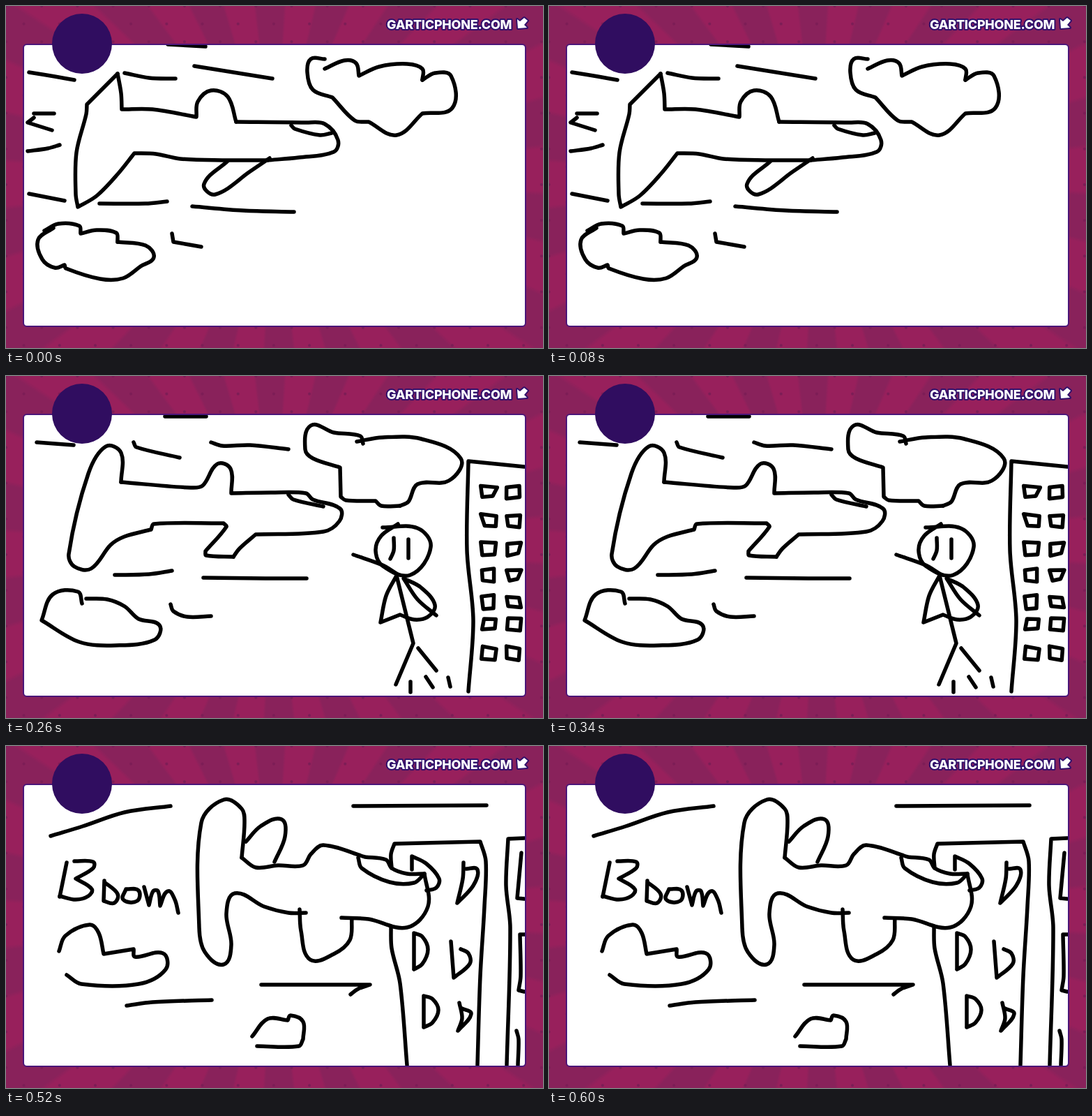
An HTML page that plays this animation: 770 px wide and 490 px high, repeating every 0.65 s.

```html
<!DOCTYPE html>
<html lang="en">
<head>
<meta charset="utf-8">
<title>Plane flip-book</title>
<style>
  html, body { margin: 0; width: 100%; height: 100%; overflow: hidden; }
  body {
    background:
      radial-gradient(circle, #7c1d56 1.7px, transparent 2.3px) 0 0 / 51.2px 51.2px,
      radial-gradient(circle, #7c1d56 1.7px, transparent 2.3px) 25.6px 25.6px / 51.2px 51.2px,
      repeating-conic-gradient(from 4deg at 50% 50%, #98205c 0 9deg, #89225b 10deg 19deg, #98205c 20deg);
  }
  svg { display: block; width: 770px; height: 490px; }
  .scene {
    fill: none; stroke: #000; stroke-width: 5.5;
    stroke-linecap: round; stroke-linejoin: round;
    visibility: hidden;
    animation: show 650ms step-end infinite;
    animation-delay: calc(var(--i) * 130ms - 650ms);
  }
  @keyframes show { 0% { visibility: visible } 20%, 100% { visibility: hidden } }
  .site { font: 800 18px Inter, "Open Sans", sans-serif; letter-spacing: -.25px; }
  .head { fill: #fff; stroke: #32106b; stroke-width: 4; stroke-linejoin: round; paint-order: stroke; }
</style>
</head>
<body>
<svg viewBox="0 0 770 490">
  <clipPath id="sheet"><rect x="26" y="56" width="718" height="402" rx="4"/></clipPath>
  <rect x="25" y="55" width="720" height="404" rx="5" fill="#fff" stroke="#4b1679" stroke-width="2"/>
  <g id="art" clip-path="url(#sheet)"></g>
  <circle cx="109" cy="54" r="43" fill="#300d60"/>
  <text class="head site" x="546" y="33">GARTICPHONE.COM</text>
  <path class="head" d="M733 19l4 3 6-5 5 4-5 6 4 4-13 1z"/>
</svg>
<script>
const art = document.getElementById("art");
let layer, count = 0;

const add = (parent, tag, attrs) => {
  const el = document.createElementNS("http://www.w3.org/2000/svg", tag);
  for (const key in attrs) el.setAttribute(key, attrs[key]);
  return parent.appendChild(el);
};

function scene(draw) {
  layer = add(art, "g", { class: "scene", style: `--i:${count++}` });
  draw();
}

const points = text => {
  const n = text.trim().split(/\s+/).map(Number);
  return n.filter((_, i) => i % 2 === 0).map((x, i) => [x, n[2 * i + 1]]);
};

// Smooth curve through the points; handles span a third of each gap, so it never overshoots.
function curve(pts) {
  const dirs = pts.map((p, i) => {
    const a = pts[Math.max(i - 1, 0)], b = pts[Math.min(i + 1, pts.length - 1)];
    const dx = b[0] - a[0], dy = b[1] - a[1], len = Math.hypot(dx, dy) || 1;
    return [dx / len, dy / len];
  });
  return pts.slice(1).map((q, i) => {
    const p = pts[i], u = dirs[i], v = dirs[i + 1];
    const k = Math.hypot(q[0] - p[0], q[1] - p[1]) / 3;
    return "C" + [p[0] + u[0] * k, p[1] + u[1] * k, q[0] - v[0] * k, q[1] - v[1] * k, ...q]
      .map(n => n.toFixed(1)).join(" ");
  }).join("");
}

// A pen stroke: x y pairs, "/" after a sharp corner.
function pen(text) {
  const runs = text.split("/").map(points);
  const d = "M" + runs[0][0] + runs.map((run, i) =>
    curve(i ? [runs[i - 1].at(-1), ...run] : run)).join("");
  add(layer, "path", { d });
}

// Two columns of wobbly square windows.
function windows(left, right, seed) {
  const wobble = () => ((seed = seed * 16807 % 2147483647) / 2147483647 - .5) * 5;
  for (const y of [166, 207, 248, 285, 324, 355, 397])
    for (const x of [left, right]) {
      const at = (dx, dy) => `${x + dx + wobble()} ${y + dy + wobble()}`;
      add(layer, "path", { d: `M${at(-9, -8)} ${at(10, -8)} ${at(8, 8)} ${at(-8, 8)}z` });
    }
}

// D-shaped window: stem, then bow.
function dee(x, y, w, h) {
  pen(`${x} ${y + h} ${x} ${y} / ${x + w * .6} ${y + h * .1} ${x + w} ${y + h * .45} ${x + w * .6} ${y + h * .85} ${x} ${y + h}`);
}

scene(() => {
  pen("232 55 286 58");
  pen("33 95 70 101 98 106");
  pen("170 96 205 103 243 104");
  pen("270 86 382 104");
  pen("40 154 69 154");
  pen("40 160 31 167 / 66 178");
  pen("31 208 60 204 77 199");
  pen("33 269 84 279");
  pen("134 283 200 283 231 280");
  pen("267 287 340 293 413 295");
  pen("238 326 240 338 / 280 345");
  // tail, belly, nose
  pen("160 97 116 141 / 115 155 101 210 100 270 103 288 / 130 272 160 241 184 211 / 215 212 250 219 310 221 375 221");
  pen("375 221 420 217 470 209 476 192 457 169 430 167 330 166");
  // canopy and back
  pen("330 166 318 130 294 121 275 137 273 159 / 210 148 166 148 / 165 125 160 97");
  pen("409 171 414 176 450 185 467 182");
  pen("318 222 284 255 300 270 350 237 378 218");
  pen("457 76 437 76 432 95 440 120 468 131 / 500 164 520 166 / 560 185 597 154 / 640 146 638 100 615 96 597 106");
  pen("597 106 597 90 575 83 535 87 506 100 / 502 82 485 78 457 90");
  pen("68 318 46 335 52 363 70 375 84 371 / 86 376 135 391 168 390 193 373 / 212 360 200 343 160 338");
  pen("160 338 158 325 130 321 107 326 / 105 315 75 312 55 322");
});

scene(() => {
  pen("232 57 295 58");
  pen("33 91 45 96 104 100");
  pen("182 92 200 107 240 107");
  pen("274 87 330 96 399 104");
  pen("137 282 195 280 242 280");
  pen("271 287 320 291 390 290 421 293");
  pen("238 328 242 340 / 289 340");
  pen("158 99 140 125 110 150 115 163 99 260 106 287 / 125 270 160 250 181 212 / 210 210 350 222 435 220 457 215");
  pen("441 211 470 211 477 192 455 168 400 165 322 167 / 329 160 330 148 302 125 282 127 270 159 / 165 148 / 166 110 160 99");
  pen("410 170 420 178 480 183");
  pen("318 221 289 255 290 267 308 268 335 243 373 223");
  pen("457 77 434 82 438 122 468 130 510 165 525 168 / 526 178 575 182 603 153 / 630 152 643 125 638 102 612 96 598 108");
  pen("598 106 590 85 550 86 510 102 / 508 85 485 79 453 89");
  pen("103 325 85 306 53 325 49 360 92 374 / 92 380 180 388 / 188 377 209 374 212 360 185 341 157 337");
  pen("157 337 155 326 130 320 103 325");
  pen("743 128 664 119 / 667 170 664 230 665 330 659 457");
  windows(691, 726, 77);
});

scene(() => {
  pen("228 58 287 58");
  pen("44 95 97 99");
  pen("183 95 187 102 249 117");
  pen("294 95 310 100 350 99 405 105");
  pen("156 285 205 284 238 279");
  pen("283 289 372 290 431 290");
  pen("236 327 240 337 260 345 294 344");
  pen("165 152 165 110 143 101 118 140 90 255 98 273 122 276 150 242 170 230 208 220 / 212 212 312 211 / 316 216 286 251 / 287 257 326 259");
  pen("326 259 335 247 358 227 / 455 223 478 208 479 190 440 177 430 168 380 167 323 168 / 322 133 303 126 282 157 265 160 165 152");
  pen("405 170 412 177 455 187");
  pen("512 97 508 86 470 81 437 71 429 105 440 118 479 131 / 480 173 / 487 178 530 179 / 538 186 565 186");
  pen("565 186 577 180 590 155 635 150 652 118 595 90 540 88 503 94");
  pen("109 326 103 309 67 313 51 350 / 105 381 157 386 213 378 220 357 190 348 170 330 145 320 115 319");
  pen("743 130 663 122 / 661 250 670 350 663 452");
  windows(692, 728, 4321);
  // stick figure
  pen("540 217 590 218 609 245 580 285 540 272 530 250 538 229 562 212");
  pen("556 232 556 250 551 262");
  pen("577 234 577 261");
  pen("498 256 540 271 560 283");
  pen("560 286 584 383 / 559 442");
  pen("591 390 617 422");
  pen("560 286 545 315 537 353 / 565 342 / 585 349 605 345 615 328 595 303 570 290 / 590 320 617 343");
  pen("580 438 580 453");
  pen("602 431 612 446");
  pen("634 432 637 445");
});

scene(() => {
  pen("26 128 55 112 100 99");
  pen("152 94 152 95");
  pen("340 93 390 94 502 88");
  pen("103 398 140 380 170 373 221 372");
  pen("314 342 400 344 480 345 / 460 348");
  pen("551 458 554 459");
  pen("218 158 217 100 198 83 174 125 171 270 186 304 / 211 255 215 225 240 210 315 242 357 243");
  pen("218 158 260 161 325 172 343 170 370 132 385 132 409 174");
  pen("214 147 232 112 264 97 259 120 243 159");
  pen("400 170 425 162 480 166 502 184 528 183");
  pen("449 165 460 195 480 201 531 188 / 534 205 528 230 490 259 435 242 401 235");
  pen("346 234 345 275 378 310 / 390 293 397 255 412 238");
  pen("37 293 62 259 75 262 96 314 / 113 292 125 293 147 311 163 313 / 161 330 150 347 80 341 50 330 38 308");
  pen("454 421 465 405 500 405 / 510 393 525 405 543 433 515 440 449 432");
  pen("570 453 565 370 556 300 550 147 556 139 600 143 680 141 / 687 165 687 230 678 290 674 450");
  pen("743 137 719 134 / 717 250 722 300 719 452");
  dee(583, 161, 36, 46);
  dee(650, 169, 26, 50);
  dee(586, 264, 20, 58);
  dee(643, 272, 27, 58);
  dee(601, 356, 23, 51);
  dee(653, 357, 7, 55);
  pen("726 158 743 168");
  pen("736 165 730 220 / 743 222");
  pen("734 284 743 284");
  pen("739 278 740 310 735 355 / 743 346");
  pen("733 402 740 410 739 456");
});

scene(() => {
  pen("64 129 110 115 170 95 236 86");
  pen("498 86 689 85");
  pen("173 372 210 367 295 364");
  pen("366 342 522 342 / 505 348 494 356");
  pen("338 160 342 110 338 90 312 77 280 110 277 260 285 295 312 313 323 285 316 240 328 211 370 230 405 239 430 239");
  pen("338 160 358 174 390 171 426 171 437 155 455 142 515 159 / 545 163 553 175 575 183 600 183 / 605 230 575 260 520 248 481 246");
  pen("344 137 365 115 395 105 400 130 385 166");
  pen("505 160 510 175 550 195 585 196 600 183");
  pen("421 234 423 265 436 306 470 298 493 278 496 247");
  // "Boom"
  pen("87 167 77 216");
  pen("98 165 125 166 125 175 100 190 / 123 205 118 215 100 220 77 215");
  pen("141 193 140 222 / 155 225 160 212 141 195");
  pen("172 205 168 220 188 222 190 207 172 205");
  pen("198 202 205 228 / 211 208 218 208 221 229 / 232 208 242 220 247 239");
  pen("76 294 85 272 120 256 133 268 140 298 / 183 291 / 185 302 225 297 229 320 190 341 108 341 87 328");
  pen("353 416 375 391 404 393 / 408 386 426 395 426 420 / 420 430 360 430");
  pen("553 175 552 155 557 140 / 680 137 / 688 165 686 230 680 330 676 457");
  pen("552 258 553 290 565 340 575 457");
  pen("743 132 720 133 / 717 200 723 260 718 457");
  pen("582 177 582 158 / 602 168 621 190 617 203 603 207");
  pen("656 167 655 190 647 225 / 670 200 676 177 660 176");
  dee(585, 268, 20, 52);
  pen("638 280 642 332 / 665 312 663 297 652 291");
  dee(599, 358, 21, 45);
  pen("650 368 654 390 648 408 / 667 384 654 376");
  pen("739 153 733 218 / 743 219");
  pen("743 270 737 270 / 738 330 735 350 / 743 352");
  pen("732 408 735 420 734 457");
});
</script>
</body>
</html>
```
